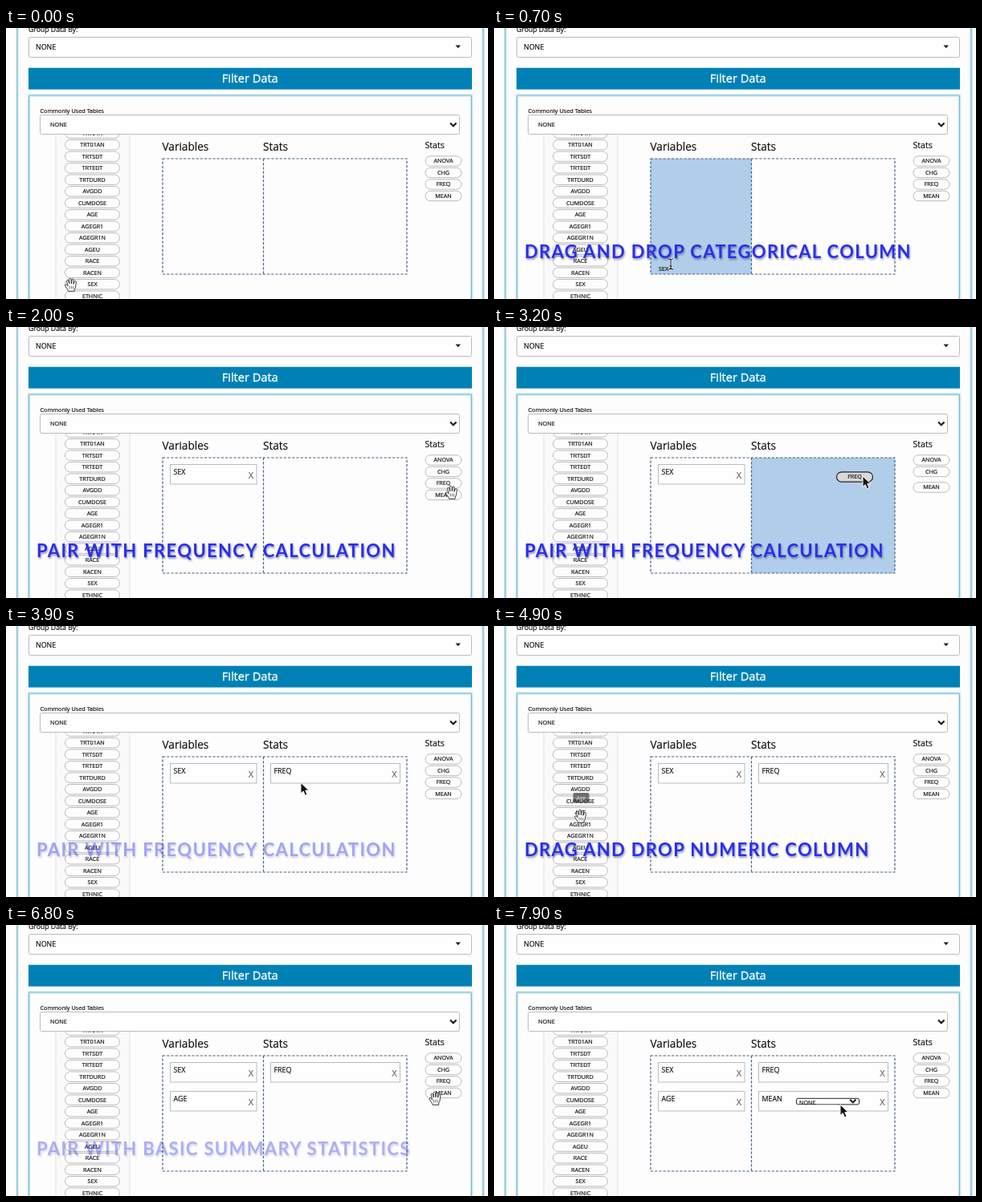
Animation, 600 px wide and 338 px high, one loop 8000 ms. Source, as an HTML page:

```html
<!DOCTYPE html>
<html lang="en">
<head>
<meta charset="utf-8">
<title>Table builder</title>
<style>
html, body { margin: 0; width: 100%; height: 100%; overflow: hidden; background: #fdfdfe; }
svg { display: block; width: 100%; height: 100%; }
text { font-family: "Open Sans", "Noto Sans", sans-serif; fill: #111; stroke: #111; stroke-width: .18; }
.chip rect { fill: #fdfdfe; stroke: #b4b4b8; stroke-width: .9; }
.chip text { font-size: 7.2px; text-anchor: middle; }
.held rect { fill: #d9d9dc; stroke: #222; stroke-width: 1.2; }
.box { fill: #fefefe; stroke: #b9bbbe; }
.dash { fill: none; stroke: #47617f; stroke-width: 1.2; stroke-dasharray: 3.2 2; }
.lit { fill: #b0cde9; }
.cross { fill: #666; stroke: #666; text-anchor: middle; }
.caption { font: 700 22px Lato, "Open Sans", sans-serif; letter-spacing: 1.35px; fill: #2a2eee; stroke: none;
  filter: drop-shadow(1px 2px 1.2px rgba(40, 50, 90, .5)); }
.glow { fill: none; stroke: #9fd3e3; stroke-width: 4; opacity: .35; }
.edge { fill: none; stroke: #72b9cf; stroke-width: 1.2; }
</style>
</head>
<body>
<svg id="stage" viewBox="0 0 600 338" preserveAspectRatio="none">
  <defs><clipPath id="below"><rect x="60" y="131" width="100" height="210"/></clipPath></defs>
</svg>
<script>
const LOOP = 8000, STEP = 100;
const stage = document.getElementById("stage");

function add(tag, attrs, parent = stage, content) {
  const node = document.createElementNS("http://www.w3.org/2000/svg", tag);
  for (const key in attrs) node.setAttribute(key, attrs[key]);
  if (content) node.textContent = content;
  parent.append(node);
  return node;
}
const group = (attrs = {}, parent) => add("g", attrs, parent);
const label = (x, y, size, words, parent, attrs = {}) =>
  add("text", { x, y, "font-size": size, ...attrs }, parent, words);
const rect = (x, y, width, height, attrs = {}, parent) =>
  add("rect", { x, y, width, height, ...attrs }, parent);
const place = (node, x, y) => node.setAttribute("transform", `translate(${x} ${y})`);
const show = (node, on) => node.setAttribute("visibility", on ? "visible" : "hidden");

function chip(x, y, width, words, parent) {
  const g = group({ class: "chip" }, parent);
  rect(-width / 2, -6.2, width, 12.4, { rx: 6.2 }, g);
  label(0, 2.4, 7.2, words, g);
  place(g, x, y);
  return g;
}

function card(x, y, width, words) {
  const g = group();
  rect(x, y, width, 24.5, { class: "box" }, g);
  label(x + 4, y + 12.5, 8.9, words, g);
  label(x + width - 7, y + 17.2, 11, "X", g, { class: "cross" });
  return g;
}

const chevron = (x, y, s, parent) => add("path", {
  d: `M${x - s} ${y - s / 2}l${s} ${s}l${s} ${-s}`, fill: "none", stroke: "#151515", "stroke-width": 2
}, parent);

// Page frame
rect(0, 0, 600, 338, { fill: "#fdfdfe" });
rect(14, -20, 580, 400, { class: "glow" });
rect(14, -20, 580, 400, { class: "edge" });
label(28, 4.5, 8.7, "Group Data By:");
rect(28.5, 11.5, 551, 25, { class: "box", rx: 2 });
label(37, 26.5, 8.9, "NONE");
add("path", { d: "M559.5 21.5h6.6l-3.3 3.8z", fill: "#222" });
rect(28, 49.7, 552, 26.9, { fill: "#0081b5" });
label(303.7, 68, 14.6, "Filter Data", stage, { "text-anchor": "middle", style: "fill:#fff;stroke:#fff;stroke-width:.3" });
rect(28.5, 84, 551, 300, { class: "glow" });
rect(28.5, 84, 551, 300, { class: "edge", rx: 1.5 });

// Column list
const list = group({ "clip-path": "url(#below)" });
rect(62, 120, 92, 230, { fill: "#fafafb", stroke: "#e2e2e5" }, list);
"TRT01A TRT01AN TRTSDT TRTEDT TRTDURD AVGDD CUMDOSE AGE AGEGR1 AGEGR1N AGEU RACE RACEN SEX ETHNIC"
  .split(" ").forEach((name, i) => chip(107.5, 131.2 + i * 14.5, 68, name, list));

label(42.5, 105.5, 7.3, "Commonly Used Tables");
rect(42.5, 108.5, 522, 24, { class: "box", rx: 2 });
label(55, 123.2, 7.3, "NONE");
chevron(556.8, 120.4, 3.8);

// Drop zones
const litVars = rect(195, 163, 125.5, 144, { class: "lit" });
const litStats = rect(320.5, 163, 178.5, 144, { class: "lit" });
rect(195, 163, 304, 144, { class: "dash" });
add("path", { d: "M320.5 163V307", class: "dash" });
label(194.5, 153, 13.6, "Variables");
label(320, 153, 13.6, "Stats");
label(521.5, 150, 10.6, "Stats");
const [, , freq, mean] = ["ANOVA", "CHG", "FREQ", "MEAN"]
  .map((name, i) => chip(544.5, 166 + i * 14.5, 45, name));

const cards = [
  [1000, card(204.5, 171.5, 107.5, "SEX")],
  [3500, card(329.5, 171.5, 161, "FREQ")],
  [5800, card(204.5, 207.5, 107.5, "AGE")],
  [7500, card(329.5, 207.5, 161, "MEAN")]
];
const pick = cards[3][1];
rect(376.5, 216.3, 78, 7.6, { rx: 2, fill: "#fff", stroke: "#222" }, pick);
label(380, 224, 7.2, "NONE", pick);
rect(378, 224.5, 50, 3, { fill: "#fefefe" }, pick);
chevron(446.8, 219.6, 3.6, pick);

// Dragged items and tooltip
const word = name => {
  const g = group();
  label(0, 2.4, 7.2, name, g, { "text-anchor": "middle" });
  return g;
};
const drags = [
  { from: 300, to: 1000, lit: litVars, dx: -9, dy: 7, node: word("SEX") },
  { from: 2300, to: 3500, lit: litStats, dx: -10, dy: 1, node: chip(0, 0, 45, "FREQ") },
  { from: 5100, to: 5800, lit: litVars, dx: -9, dy: 7, node: word("AGE") },
  { from: 6900, to: 7500, lit: litStats, dx: 10, dy: 1, node: chip(0, 0, 45, "MEAN") }
];
[1, 3].forEach(i => drags[i].node.classList.add("held"));

const tip = group();
rect(98.5, 208, 20, 12.5, { rx: 2, fill: "#333" }, tip);
label(108.5, 216.6, 6.5, "Age", tip, { "text-anchor": "middle", style: "fill:#ddd;stroke:none" });

// Pointers, hotspot at the origin
const arrow = group(), hand = group(), beam = group();
add("path", { d: "M0 0V13.5L3.2 10.6L5.4 15.8L8 14.7L5.8 9.6H10z", fill: "#111", stroke: "#fff", "stroke-width": 1 }, arrow);
add("path", {
  d: "M-3.2 15.5C-4 12.5 -6.5 10.5 -7.3 8.3C-7.5 6.8 -5.8 6.6 -4.7 8L-3.7 9L-5.2 3C-5.4 1.3 -3.4 1 -3 2.6L-2 6L-2.2 .8C-2.2 -1 .1 -1 .3 .8L.6 6L1.3 1.2C1.6 -.4 3.7 0 3.5 1.7L3.1 6.5L4.5 3.5C5.3 2.1 7 2.9 6.6 4.4C5.8 8 6.3 11 4.3 13.3V15.5Z",
  fill: "#fff", stroke: "#222", "stroke-width": .9, "stroke-linejoin": "round", transform: "translate(.8 .8)"
}, hand);
add("path", { d: "M-.9 9.8V13.4M1.4 9.8V13.4M3.6 9.8V13.4", stroke: "#333", "stroke-width": .7 }, hand);
for (const [stroke, width] of [["#fff", 2.6], ["#151515", 1.1]])
  add("path", { d: "M-3 -6Q0 -6 0 -4Q0 -6 3 -6M0 -4V5M-3 7Q0 7 0 5Q0 7 3 7M-1.5 3H1.5", fill: "none", stroke, "stroke-width": width }, beam);

// Captions: words, fade in start, fade out start
const captions = [
  ["DRAG AND DROP CATEGORICAL COLUMN", 100, 1300],
  ["PAIR WITH FREQUENCY CALCULATION", 1600, 3700],
  ["DRAG AND DROP NUMERIC COLUMN", 4300, 5900],
  ["PAIR WITH BASIC SUMMARY STATISTICS", 6650, 7400]
].map(([words, start, end]) => ({
  start, end, node: add("text", { x: 38, y: 287, class: "caption" }, stage, words)
}));

// Pointer path: time, x, y
const path = [
  [0, 80, 312], [200, 80, 312], [700, 220, 294], [900, 238, 238], [1100, 240, 230],
  [1800, 550, 197], [2000, 554, 198], [2300, 553, 198], [3200, 459, 186], [3600, 425, 188],
  [4700, 107, 229], [5100, 107, 229], [5700, 242, 226], [5900, 244, 226],
  [6700, 533, 208], [6900, 534, 208], [7400, 440, 218], [7900, 431, 224], [8000, 431, 224]
];
const hands = [[0, 300], [1800, 2300], [4500, 5100], [6600, 6900]];
const beams = [[300, 1100], [5100, 5900]];
const within = (t, spans) => spans.some(([a, b]) => t >= a && t < b);
const clamp = v => Math.max(0, Math.min(1, v));

function pointer(t) {
  const i = path.findIndex(p => p[0] > t);
  const [t0, x0, y0] = path[i - 1], [t1, x1, y1] = path[i];
  const u = (t - t0) / (t1 - t0), k = u * u * (3 - 2 * u);
  return [x0 + (x1 - x0) * k, y0 + (y1 - y0) * k];
}

function draw(t) {
  const [x, y] = pointer(t);
  const isHand = within(t, hands), isBeam = within(t, beams);
  [[hand, isHand], [beam, isBeam], [arrow, !isHand && !isBeam]].forEach(([node, on]) => {
    show(node, on);
    place(node, x, y);
  });

  show(litVars, false);
  show(litStats, false);
  for (const d of drags) {
    const on = t >= d.from && t < d.to;
    show(d.node, on);
    place(d.node, x + d.dx, y + d.dy);
    const over = d.lit === litVars ? x > 195 && x < 320 : x > 320 && x < 499;
    if (on && over) show(d.lit, true);
  }

  const freqOut = within(t, [[2300, 3500]]);
  show(freq, !freqOut);
  show(mean, !within(t, [[6900, 7500]]));
  place(mean, 544.5, freqOut ? 200 : 209.5);
  cards.forEach(([start, node]) => show(node, t >= start));
  tip.setAttribute("opacity", .65 * clamp(Math.min((t - 4700) / 200, (5200 - t) / 200)));
  for (const c of captions)
    c.node.setAttribute("opacity", clamp(Math.min((t - c.start) / 400, 1 - (t - c.end) / 350)));
}

const began = performance.now();
function tick(now) {
  const t = Math.max(0, now - began) % LOOP;
  draw(Math.floor(t / STEP) * STEP);
  requestAnimationFrame(tick);
}
draw(0);
requestAnimationFrame(tick);
</script>
</body>
</html>
```
